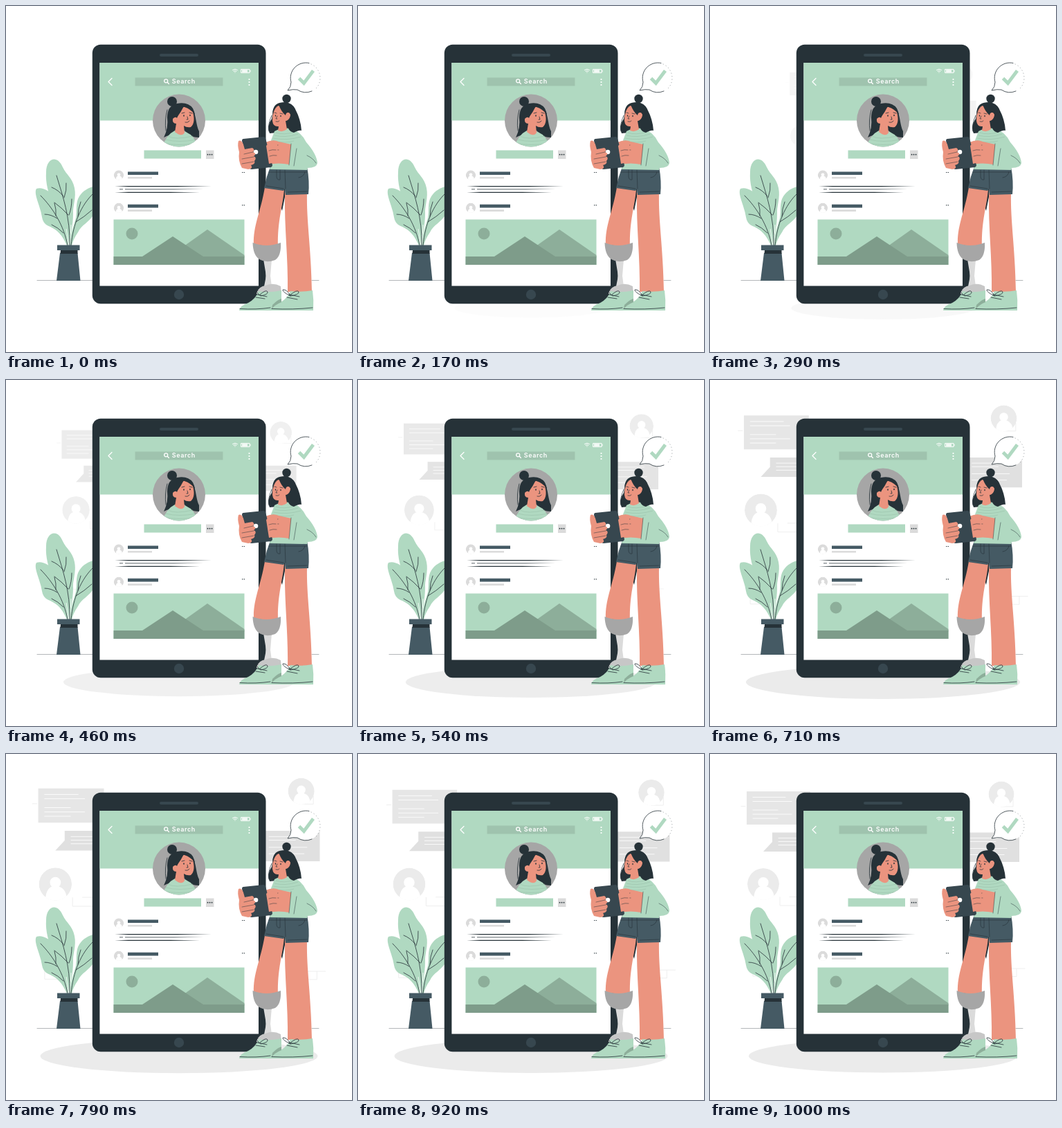
An HTML page for the animation above (1040 ms loop, 500 by 500 pixels).

```html
<!DOCTYPE html>
<html lang="en">
<head>
<meta charset="utf-8">
<title>Social profile</title>
<style>
html, body { margin: 0; width: 100%; height: 100%; overflow: hidden; background: #fff }
svg { display: block; width: 100%; height: 100%; stroke-width: .8 }
.green { fill: #b0d9c1 } .dark { fill: #263238 } .slate { fill: #455a64 }
.skin { fill: #eb947f } .white { fill: #fff } .gray { fill: #dbdbdb }
.pale { fill: #ebebeb } .box { fill: #e6e6e6 } .tail { fill: #e0e0e0 }
.ink, .rule, .faint { fill: none; stroke: #263238; stroke-linecap: round; stroke-linejoin: round }
.rule { stroke: #fff }
.faint { stroke: #ebebeb }
text { font: 600 9px Inter, sans-serif; letter-spacing: .6px; fill: #fff }
</style>
</head>
<body>
<svg viewBox="0 0 500 500">
<defs>
  <clipPath id="disc"><circle r="10"/></clipPath>
  <clipPath id="portrait"><circle cx="250" cy="165.500" r="38"/></clipPath>
  <g id="user" clip-path="url(#disc)">
    <circle r="10"/>
    <circle class="white" cy="-1" r="3.300"/>
    <path class="white" d="M-6 10Q-6 3 -2 1.500L2 1.500Q7 3 7 10Z"/>
  </g>
  <g id="post">
    <use href="#user" class="gray" transform="translate(163 244.500) scale(.72)"/>
    <path class="slate" d="M176 239.500h44v4.600h-44z"/>
    <path class="gray" d="M176 247h35v2.600h-35z"/>
    <path class="ink" stroke-width="1.200" d="M341.500 240.500h.4m2.200 0h.4"/>
  </g>
</defs>

<ellipse id="shadow" class="pale" cx="250" cy="436.500" rx="194" ry="24"/>

<g id="backdrop">
  <path class="box" d="M53 54h92v48H53z"/>
  <path class="rule" d="M62 62.500h47M62 68.500h56M62 81h36M62 87h56M62 93h36"/>
  <path class="tail" d="M90 113.500h55v27.500H77l13-14z"/>
  <path class="rule" d="M99 121.500h40M99 126.500h40M99 131.500h40"/>
  <use href="#user" class="pale" transform="translate(77 188) scale(2.300)"/>
  <path class="faint" d="M45 75.500h6M115 206.500h16M101 207v12h30M62 305v16h20M438 65v11h-17M430 310h25M430 321.500h13v-11"/>
  <path class="tail" d="M365 113.500h82v42.500h-82z"/>
  <path class="rule" d="M376 121.500h49M376 126.500h37M376 136.500h53M376 145.500h49"/>
  <use href="#user" class="pale" transform="translate(421 58) scale(1.850)"/>
</g>

<path class="ink" stroke-width=".5" opacity=".7" d="M45 396.500h80M442 396.500h10"/>

<!-- plant -->
<path class="green" d="M90 346C86 324 77 308 68 288C61 270 57 256 58 240C58 220 74 214 82 233C87 244 96 248 99 263C102 277 96 290 97 300C97 318 93 330 92 346Z"/>
<path class="green" d="M88 346C81 330 74 324 64 319C51 314 53 306 50 296C47 284 40 270 44 264C52 261 63 267 67 274C73 283 74 291 75 297C80 314 88 328 89 346Z"/>
<path class="green" d="M92 346C93 329 98 318 101 306C103 296 100 284 106 275C111 267 120 262 127 261V301C120 313 109 316 104 327Q97 337 95 346Z"/>
<path d="M94 316L92 346M87 322L91 346" stroke="#fff"/>
<path class="ink" d="M73 245C82 275 93 305 92 346M90 302Q80 291 70 284M91 302Q95 292 95 279M83 275Q76 266 66 262M84 277Q88 266 87 256M50 274C68 292 84 318 89 346M74 307Q65 301 56 301M72 303Q73 294 70 285M83 328Q75 320 66 316M127 270C108 288 97 315 94 346M104 304Q104 293 108 283M101 312Q113 305 124 295"/>
<path class="slate" d="M74 345.500h32.500v7.500H74zM78 357h25.500l4 40H73z"/>
<path class="dark" d="M79 353h24.500v5H78.500z"/>

<!-- device -->
<rect class="dark" x="124.800" y="55.700" width="250.700" height="374.600" rx="12"/>
<rect x="222" y="69" width="56" height="4" rx="2" fill="#37474f"/>
<circle cx="250" cy="417" r="7.200" fill="#37474f"/>
<path class="white" d="M135.400 82H365v322.500H135.400z"/>
<path class="green" d="M135.400 82H365v83.500H135.400z"/>
<path d="M186.500 103.500h127v12h-127z" fill="#9fc3ae"/>
<text x="239.700" y="112.300">Search</text>
<g fill="none" stroke="#fff" stroke-width="1.300" stroke-linecap="round" stroke-linejoin="round">
  <circle cx="231.200" cy="108.300" r="2.500"/>
  <path d="M233.200 110.300l2.200 2.200M153 104.500l-5 5 5 5"/>
  <path stroke-width="1" d="M327.500 92.500q3.500-2.600 7 0M329 94.300q2-1.500 4 0M330.800 96h.3M340 91.500h12v5h-12zM353 93v2"/>
  <path stroke-width="2.200" d="M351.500 106h0m0 4h0m0 4h0"/>
</g>
<path class="white" d="M341 92.500h8v3h-8z"/>

<!-- portrait -->
<circle cx="250" cy="165.500" r="38" fill="#a6a6a6"/>
<g clip-path="url(#portrait)">
  <circle class="dark" cx="240" cy="138" r="7"/>
  <path class="dark" d="M228 190Q235 176 233 161Q233 144 247 141Q263 138 270 148C275 160 275 174 279 181V190Q266 190 258 180L243 186Q235 186 228 190Z"/>
  <path class="green" d="M226 205Q230 187 244 180L260 182Q274 188 277 205Z"/>
  <path class="skin" d="M246 170Q240 170 241 163Q245 159 247 162Q250 156 252 147Q261 144 269 150Q275 168 267 175Q261 176 257 173L258 183Q254 190 244 182Z"/>
  <path class="dark" d="M246 146Q253 142 258 143Q253 153 247 161ZM258 143Q271 144 273 157Q267 149 258 146Z"/>
  <path class="ink" d="M254 155l4-1M265 154l4 1M262 160l1 4h-2M259 168q4 1 6-2M233 150Q229 165 231 180"/>
  <path class="ink" stroke-width="1.500" d="M257 158v1M266 157.500v1"/>
  <path d="M234 188q10 6 36 0M231 193q18 5 44 0M228 198q20 5 49 0" fill="none" stroke="#95bba5" stroke-width=".5"/>
</g>

<path class="green" d="M199.500 208.500H282v12h-82.500z"/>
<path class="gray" d="M289 208.500h11.500V221H289z"/>
<path class="ink" stroke-width="1.700" d="M291.500 214.700h.1m2.900 0h.1m2.900 0h.1"/>
<use href="#post"/>
<use href="#post" y="47.300"/>
<path class="dark" d="M157 260.600l20-.5h70l50 .6-50 .6h-70zM157 269.200l20-.5h60l43 .6-43 .6h-60zM164 264.400h5v.8h-5zM172 264.400h70l43 .4-43 .5h-70z"/>

<path class="green" d="M155.500 308.500h189V374h-189z"/>
<path fill="#8dae9a" d="M236 362L291 323 344.500 360V363z"/>
<path fill="#7e9c8a" d="M155.500 362H197L241 333 285 362h59.500v12h-189z"/>
<circle cx="182" cy="329" r="8.500" fill="#8dae9a"/>

<!-- speech bubble -->
<path class="white" d="M407 122Q412 117 412 109A22 22 0 1 1 421 121Q416 120 407 122Z"/>
<path class="ink" d="M438 82.500A22 22 0 0 0 412 110Q412 117 407 122Q415 120 421 121A22 22 0 0 0 442 123"/>
<path class="ink" opacity=".5" stroke-dasharray=".5 4" d="M441 84A22 22 0 0 1 446 121"/>
<path d="M423.500 104.500l7 7L444 93.500" fill="none" stroke="#b0d9c1" stroke-width="5"/>

<!-- legs and shoes -->
<path class="dark" d="M388 262L404 259 403 276 399 296Z"/>
<path class="skin" d="M403 270H435C434 310 441 350 442 413H407C408 365 402 320 403 270ZM374 262L402 265C400 290 392 310 393 348L358 345C357 317 368 298 374 262Z"/>
<path class="gray" d="M372 366h12l-2 24 2 15H373l3-15z"/>
<path fill="#a6a6a6" d="M356.500 342Q376 350 397 342Q398 361 389 367Q376 372 366 366Q357 360 356.500 342Z"/>
<path fill="#c7c7c7" d="M362 414Q366 405 375 404Q386 399 397 405L398 416H362Z"/>
<path class="green" d="M337 440Q338 433 350 429Q361 423 365 412Q380 415 398 411V440ZM383 440Q385 432 397 428Q407 422 411 412Q428 414 443 411Q445 425 444 440Z"/>
<path d="M385 432Q393 424 398 423V428Q388 432 384 438Z" fill="#8dae9a"/>
<path class="ink" d="M338 437.500Q362 439 382 436M384 437.500Q415 439 443 436M363 417l14 3M361 421l13 2M367 417q9-8 11-4q1 4-10 6q-10-8-4-8M409 417l15 3M406 421l15 3M410 418q11-9 13-5q1 4-12 6q-12-6-11-9q6-1 11 9"/>

<!-- shorts and top -->
<path class="slate" d="M382 232H435Q439 254 437 272L404 273 403 264 401 267 373 263Q376 247 382 232Z"/>
<path class="ink" stroke-width=".6" d="M380 240h55M391 237v10q1 5 5 4V237M403 237l1 27M432 240q-2 7-9 8M376 260l25 4M407 269l28-1"/>
<circle class="dark" cx="405.500" cy="134" r="6.200"/>
<path class="dark" d="M386 150Q388 139 403 139Q414 140 418 149L412 181 381 184Q376 174 384 163Z"/>
<path class="green" d="M388 181Q401 174 413 178Q426 181 434 197Q449 214 450 227Q449 234 436 234L435 237 381 236Q388 210 383 194Z"/>
<path d="M390 183q11 4 27-1M388 187q15 4 34-2M386 191q20 4 40-2M386 195q19 4 30 0" fill="none" stroke="#95bba5" stroke-width=".5"/>
<path class="skin" d="M386 153Q389 145 394 144Q400 148 404 155Q410 152 411 158Q410 165 404 166L406 178Q400 183 393 180L394 174Q386 175 385 166Q385 158 386 153Z"/>
<path class="dark" d="M394 142Q397 152 404 158Q405 152 410 154Q413 160 406 166Q406 181 416 183Q424 179 427 180Q426 164 418 149Q412 139 394 142ZM396 142Q387 147 386 157Q383 146 396 142Z"/>
<path class="skin" d="M405 156Q409 152 411 157Q410 165 404 166Z"/>
<path class="ink" stroke-width=".7" d="M388 154l3 1M396 155l4 1M392 159l-2 4h2M390 167q4 1 5-1M384 158Q378 171 380 181"/>
<path class="ink" stroke-width="1.300" d="M389.500 158v1M397 158.500v1"/>

<!-- arms and handheld -->
<path class="skin" d="M375 197Q386 192 394 196L412 200 409 229Q394 226 379 229Z"/>
<path class="ink" stroke-width=".5" d="M412 199L409 230M420 206L416 231M385 202l8-1M384 208l10 0M435 216Q444 220 448 227"/>
<path fill="#37474f" d="M343 192L372 189Q374 189 375 191L385 230Q385 232 383 233L355 236Q352 236 351 233L341 195Q341 192 343 192Z"/>
<circle class="white" cx="361" cy="211" r="3.300"/>
<path class="skin" d="M376 202Q381 196 392 200L393 225 380 228Z"/>
<path class="skin" d="M336 195Q340 193 343 200L345 207 356 205Q360 207 357 211Q363 213 358 217Q363 219 359 224Q361 228 354 230Q358 235 350 236L341 234Q335 224 337 211Q334 201 336 195Z"/>
<path class="ink" stroke-width=".5" d="M357 211l-13 3M358 218l-17 3M358 225l-17 3M380 209q5-2 10-1M381 217q5-2 10-1"/>
</svg>
<script>
const LOOP = 1040, STEP = 41.6, FPS = 24, LEAD = .03;
const mix = (a, b, u) => 3 * (1 - u) ** 2 * u * a + 3 * (1 - u) * u * u * b + u ** 3;

// cubic-bezier(.36, -.01, .5, 1.38), inverted by bisection
function ease(x) {
  let low = 0, high = 1;
  for (let i = 0; i < 30; i++) {
    const mid = (low + high) / 2;
    if (mix(.36, .5, mid) < x) low = mid; else high = mid;
  }
  return mix(-.01, 1.38, low);
}

const shadow = document.getElementById('shadow');
const backdrop = document.getElementById('backdrop');

function zoom(el, x, y, p) {
  const s = .5 + p / 2;
  el.setAttribute('transform', `translate(${x} ${y}) scale(${s}) translate(${-x} ${-y})`);
  el.setAttribute('opacity', Math.max(0, Math.min(1, p)));
}

function draw(now) {
  const step = Math.floor((now % LOOP + 5) / STEP) % 25;
  const p = ease(Math.min(1, step / FPS + LEAD));
  zoom(shadow, 250, 436.5, p);
  zoom(backdrop, 250, 187, p);
}

const start = performance.now();
function tick() {
  draw(performance.now() - start);
  requestAnimationFrame(tick);
}
tick();
</script>
</body>
</html>
```
